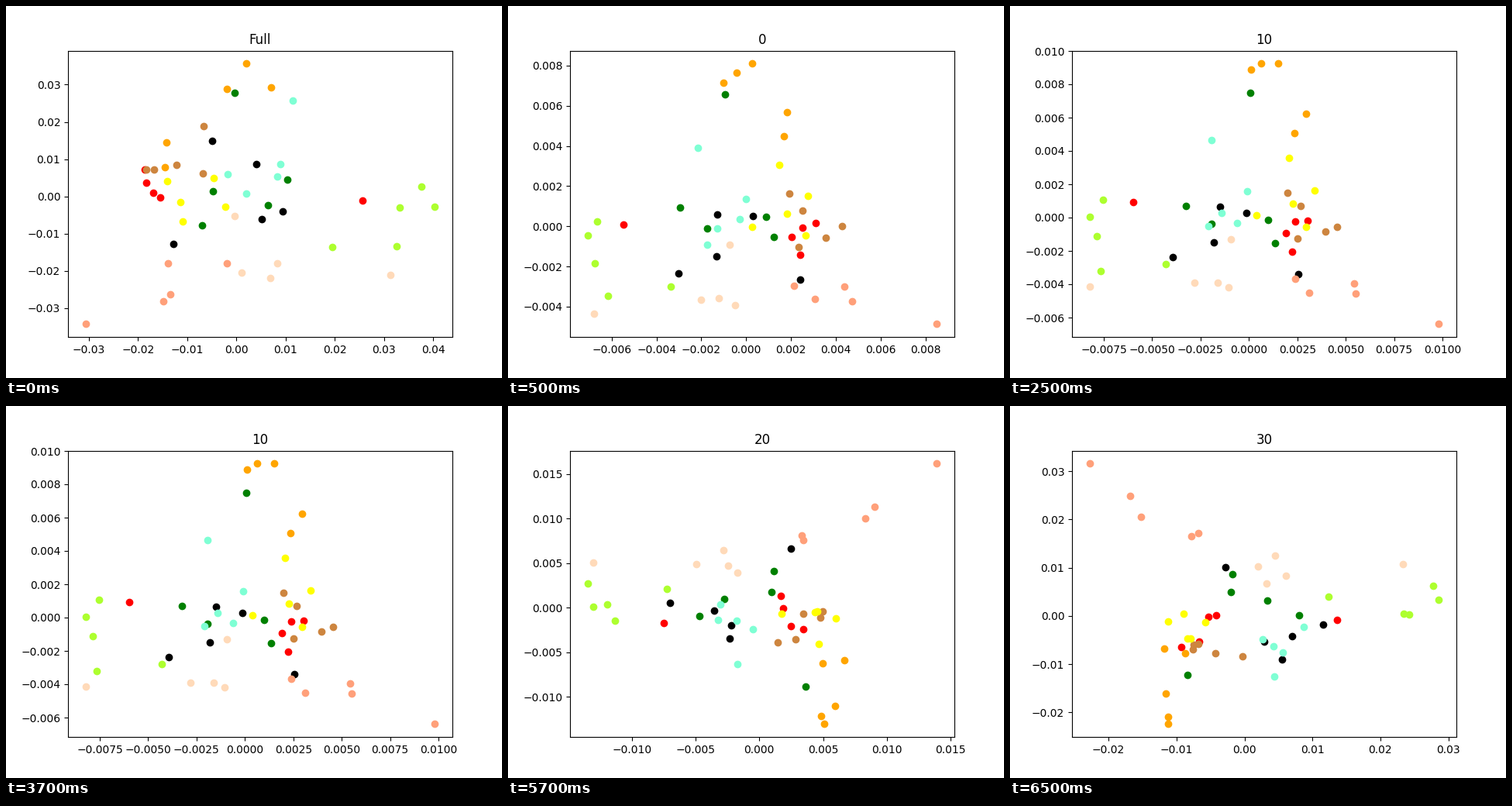
Animation of 640x480 px, one loop 8 s. Source, as a matplotlib script:

```python
import numpy as np
import matplotlib.pyplot as plt
from matplotlib.animation import FuncAnimation

WIDTH, HEIGHT, DPI = 640, 480, 100
LEFT, RIGHT, TOP, BOTTOM = 80, 576, 57.6, 427.2
FRAMES, INTERVAL = 16, 500

plt.rcParams["font.family"] = "DejaVu Sans"
scenes = []


def add_scene(title, origin, scale, **groups):
    """Store a scatter; groups map a colour to its dots in stage pixels,
    origin is the pixel of (0, 0) and scale the pixels per data unit."""
    def to_data(points):
        return (np.array(points) - origin) / (scale[0], -scale[1])

    limits = to_data([(LEFT, BOTTOM), (RIGHT, TOP)])
    dots = {color: to_data(points) for color, points in groups.items()}
    scenes.append((title, limits, dots))


add_scene(
    "Full", (297.3, 245.5), (6350, 4800),
    red=[(179, 211), (181, 228), (190, 241), (199, 247), (460, 251)],
    green=[(295, 112), (363, 224), (267, 239), (338, 257), (253, 283)],
    black=[(266, 174), (323, 204), (357, 265), (330, 275), (216, 307)],
    orange=[(310, 74), (342, 105), (285, 107), (207, 176), (205, 208)],
    peru=[(181, 211), (191, 211), (220, 205), (255, 155), (254, 216)],
    yellow=[(208, 226), (225, 253), (228, 278), (268, 222), (283, 259)],
    aquamarine=[(370, 122), (354, 204), (350, 220), (286, 217), (310, 242)],
    greenyellow=[(421, 311), (504, 310), (508, 260), (536, 233), (553, 259)],
    peachpuff=[(295, 271), (304, 344), (341, 351), (350, 332), (496, 347)],
    lightsalmon=[(103, 410), (203, 381), (212, 372), (209, 332), (285, 332)],
)
add_scene(
    "0", (307.3, 284.3), (28935, 25920),
    red=[(149, 282), (380, 286), (366, 298), (397, 280), (377, 321)],
    green=[(280, 114), (222, 260), (257, 287), (333, 272), (343, 298)],
    black=[(270, 269), (316, 271), (269, 323), (220, 345), (377, 353)],
    orange=[(278, 99), (295, 86), (315, 74), (360, 137), (356, 168)],
    peru=[(363, 242), (380, 264), (431, 284), (410, 299), (375, 311)],
    yellow=[(350, 205), (387, 245), (360, 268), (384, 296), (315, 285)],
    aquamarine=[(245, 183), (307, 249), (299, 275), (270, 287), (257, 308)],
    greenyellow=[(115, 278), (103, 296), (112, 332), (129, 374), (210, 362)],
    peachpuff=[(286, 308), (249, 379), (272, 377), (293, 386), (111, 397)],
    lightsalmon=[(369, 361), (396, 378), (434, 362), (444, 381), (553, 410)],
)
add_scene(
    "10", (308.3, 273), (24980, 21500),
    red=[(159, 253), (368, 278), (384, 277), (356, 293), (364, 317)],
    green=[(310, 112), (227, 258), (260, 281), (333, 276), (342, 306)],
    black=[(271, 259), (305, 267), (263, 305), (210, 324), (372, 346)],
    orange=[(311, 82), (324, 74), (346, 74), (382, 139), (367, 164)],
    peru=[(358, 241), (375, 258), (422, 285), (407, 291), (371, 300)],
    yellow=[(360, 196), (393, 238), (365, 255), (382, 285), (318, 270)],
    aquamarine=[(260, 173), (306, 239), (273, 267), (293, 280), (256, 284)],
    greenyellow=[(120, 250), (103, 272), (112, 297), (117, 342), (201, 333)],
    peachpuff=[(285, 301), (238, 357), (268, 357), (282, 363), (103, 362)],
    lightsalmon=[(368, 352), (386, 370), (444, 358), (446, 371), (553, 410)],
)
add_scene(
    "20", (324.3, 260.3), (16440, 11500),
    red=[(201, 280), (352, 245), (355, 261), (365, 284), (381, 288)],
    green=[(343, 213), (340, 240), (279, 249), (247, 271), (384, 362)],
    black=[(365, 184), (209, 254), (266, 264), (288, 283), (286, 300)],
    orange=[(434, 328), (406, 332), (422, 387), (404, 400), (408, 410)],
    peru=[(381, 268), (406, 265), (403, 273), (371, 301), (348, 305)],
    yellow=[(353, 268), (396, 266), (399, 265), (423, 274), (401, 307)],
    aquamarine=[(274, 256), (271, 276), (295, 277), (316, 288), (296, 333)],
    greenyellow=[(103, 229), (110, 259), (128, 256), (138, 277), (205, 236)],
    peachpuff=[(110, 202), (243, 204), (278, 186), (284, 206), (296, 215)],
    lightsalmon=[(553, 74), (473, 130), (461, 145), (379, 167), (381, 173)],
)
add_scene(
    "30", (302.5, 270.8), (8770, 6220),
    red=[(256, 272), (266, 270), (244, 304), (221, 311), (422, 276)],
    green=[(287, 217), (285, 240), (332, 251), (373, 270), (229, 347)],
    black=[(278, 208), (404, 282), (364, 297), (328, 304), (351, 327)],
    orange=[(199, 313), (226, 319), (201, 371), (204, 401), (204, 410)],
    peru=[(237, 308), (243, 307), (236, 314), (265, 319), (300, 323)],
    yellow=[(204, 278), (224, 268), (252, 279), (229, 300), (233, 300)],
    aquamarine=[(379, 285), (326, 301), (340, 310), (352, 318), (341, 349)],
    greenyellow=[(411, 246), (508, 268), (515, 269), (546, 232), (553, 250)],
    peachpuff=[(320, 207), (342, 193), (356, 219), (331, 229), (507, 204)],
    lightsalmon=[(103, 74), (155, 116), (169, 143), (234, 168), (243, 164)],
)

fig = plt.figure(figsize=(WIDTH / DPI, HEIGHT / DPI), dpi=DPI)
ax = fig.add_axes([LEFT / WIDTH, 1 - BOTTOM / HEIGHT,
                   (RIGHT - LEFT) / WIDTH, (BOTTOM - TOP) / HEIGHT])


def draw(frame):
    # The first scene lasts one step, the following ones four steps each.
    title, limits, dots = scenes[(frame + 3) // 4]
    ax.clear()
    for color, points in dots.items():
        ax.scatter(*points.T, color=color)
    ax.set_xlim(limits[:, 0])
    ax.set_ylim(limits[:, 1])
    ax.set_title(title)


animation = FuncAnimation(fig, draw, frames=FRAMES, init_func=lambda: draw(0),
                          interval=INTERVAL, repeat=True, repeat_delay=0)
plt.show()
```
